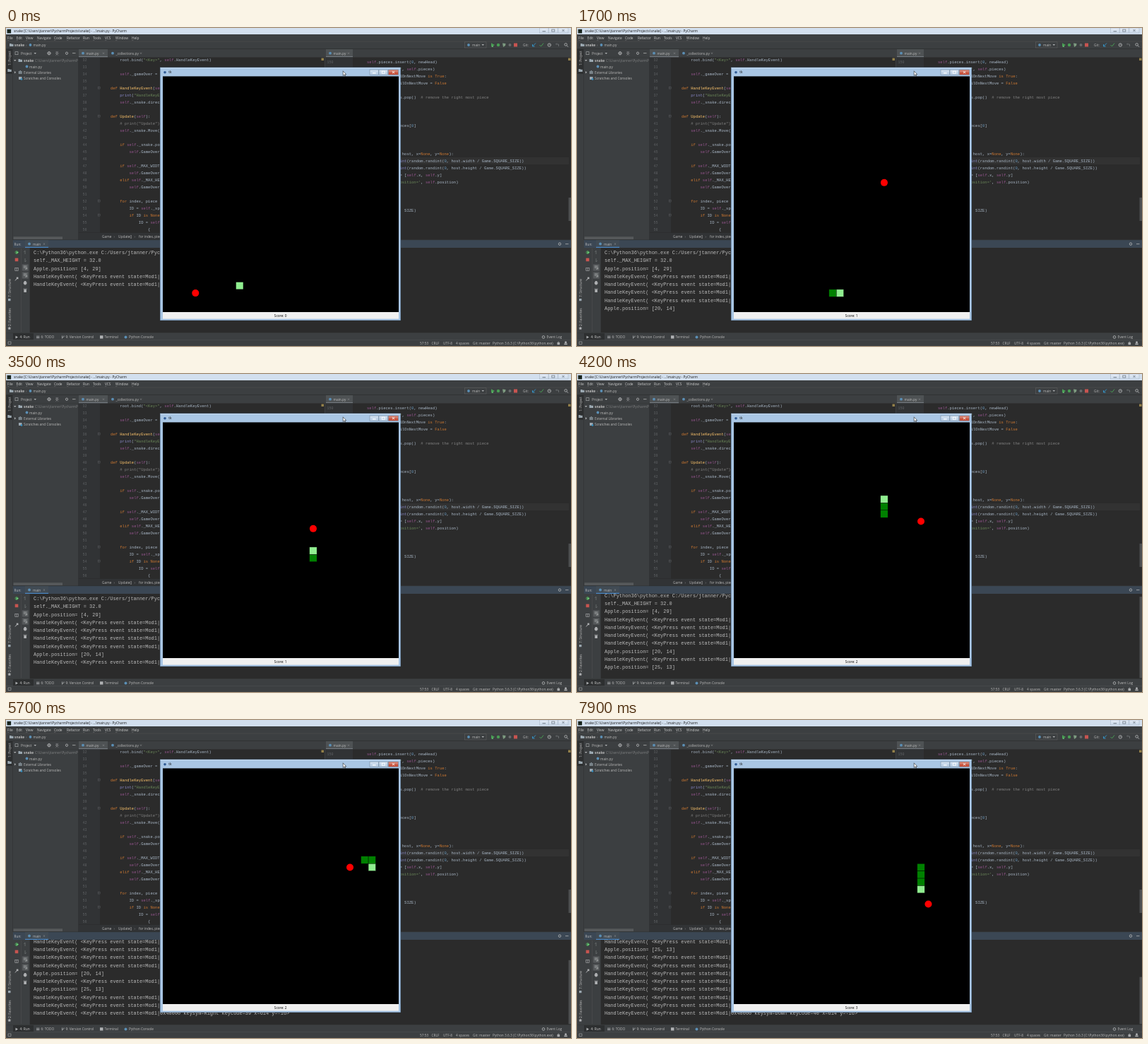
Recreate the animation shown at these times as an HTML page with a canvas. Size 800 by 450 pixels, loop 8000 ms.

```html
<!DOCTYPE html>
<html lang="en">
<head>
<meta charset="utf-8">
<title>Snake</title>
<style>
html, body { margin: 0; width: 100%; height: 100%; overflow: hidden; background: #2b2b2b; }
canvas { display: block; }
</style>
</head>
<body>
<canvas id="stage" width="800" height="450"></canvas>
<script>
const ctx = document.getElementById('stage').getContext('2d');
const SANS = '"Open Sans", sans-serif';
const MONO = '"Liberation Mono", monospace';
const STEP = 100, STEPS = 80;
const PANEL = '#3c3f41', EDITOR = '#2b2b2b', TEXT = '#bbbbbb', DIM = '#8a8c8d', ICON = '#afb1b3';
const RED = '#c75450', GREEN = '#499c54', BLUE = '#3592c4', THUMB = '#4d4f50';

function rect(x, y, w, h, color) {
  ctx.fillStyle = color;
  ctx.fillRect(x, y, w, h);
}

function frame(x, y, w, h, color, width = 0.6) {
  ctx.strokeStyle = color;
  ctx.lineWidth = width;
  ctx.strokeRect(x, y, w, h);
}

function disc(x, y, r, color) {
  ctx.fillStyle = color;
  ctx.beginPath();
  ctx.arc(x, y, r, 0, Math.PI * 2);
  ctx.fill();
}

function ring(x, y, r, color) {
  ctx.strokeStyle = color;
  ctx.lineWidth = 0.9;
  ctx.beginPath();
  ctx.arc(x, y, r, 0, Math.PI * 2);
  ctx.stroke();
}

function line(color, width, ...points) {
  ctx.strokeStyle = color;
  ctx.lineWidth = width;
  ctx.beginPath();
  for (let i = 0; i < points.length; i += 2) ctx.lineTo(points[i], points[i + 1]);
  ctx.stroke();
}

function shape(color, ...points) {
  ctx.fillStyle = color;
  ctx.beginPath();
  for (let i = 0; i < points.length; i += 2) ctx.lineTo(points[i], points[i + 1]);
  ctx.fill();
}

// Laid out at ten times the size so that tiny glyphs keep exact advances.
const BASELINE_DROP = 0.7;
function text(str, x, y, { color = TEXT, size = 4.8, font = SANS, weight = '', align = 'left', turn = 0 } = {}) {
  ctx.save();
  ctx.translate(x, y);
  ctx.rotate(turn);
  ctx.translate(0, BASELINE_DROP);
  ctx.scale(0.1, 0.1);
  ctx.font = `${weight} ${size * 10}px ${font}`;
  ctx.textAlign = align;
  ctx.textBaseline = 'middle';
  ctx.fillStyle = color;
  ctx.fillText(str, 0, 0);
  ctx.restore();
}

// Code editors
const CHAR = 3.32, CODE_SIZE = CHAR / 0.6001;
const TOKENS = /(#.*)|("[^"]*"|'[^']*')|\b(def|if|elif|else|for|is|in|or|return|None|True|False)\b|\b(self)\b|\b(print|int)\b|(\d+)|((?<=def )\w+)|[^\s\w#"']+|\w+|\s+/g;
const TOKEN_COLORS = ['#808080', '#6a8759', '#cc7832', '#94558d', '#8888c6', '#6897bb', '#ffc66d'];

function code(src, x, y) {
  for (const match of src.matchAll(TOKENS)) {
    const kind = match.slice(1).findIndex(group => group !== undefined);
    text(match[0], x + match.index * CHAR, y, { color: TOKEN_COLORS[kind] || '#a9b7c6', size: CODE_SIZE, font: MONO });
  }
}

const LEFT_CODE = `        root.bind("<Key>", self.HandleKeyEvent)

        self._gameOver = False

    def HandleKeyEvent(self, event):
        print("HandleKeyEvent(", event)
        self._snake.direction = event

    def Update(self):
        # print("Update")
        self._snake.Move()

        if self._snake.position:
            self.GameOver()

        if self._MAX_WIDTH:
            self.GameOver()
        elif self._MAX_HEIGHT:
            self.GameOver()

        for index, piece in self:
            ID = self._sprites
            if ID is None:
                ID = self._canvas
                    {`.split('\n');

const RIGHT_CODE = `    self.pieces.insert(0, newHead)
    print('pieces=', self.pieces)
    if self.addTailOnNextMove is True:
        self.addTailOnNextMove = False
    else:
        self.pieces.pop()  # remove the right most piece



    return self.pieces[0]



def __init__(self, host, x=None, y=None):
    self.x = x or int(random.randint(0, host.width / Game.SQUARE_SIZE))
    self.y = y or int(random.randint(0, host.height / Game.SQUARE_SIZE))
    self.position = [self.x, self.y]
    print('Apple.position=', self.position)



                    SIZE)`.split('\n');

function pyIcon(x, y) {
  disc(x, y, 1.9, '#5b8fb5');
}

function folder(x, y) {
  shape('#9aa7b0', x, y - 2, x + 2.2, y - 2, x + 3, y - 1.2, x + 5.5, y - 1.2, x + 5.5, y + 2, x, y + 2);
}

function cross(x, y, r, color, width = 0.6) {
  line(color, width, x - r, y - r, x + r, y + r);
  line(color, width, x + r, y - r, x - r, y + r);
}

function tab(x, w, label, active) {
  rect(x, 30, w, 11, active ? '#4e5254' : PANEL);
  if (active) rect(x, 40, w, 1.2, '#747a80');
  pyIcon(x + 6, 35.7);
  text(label, x + 10.5, 35.8);
  cross(x + w - 6, 35.7, 1.1, DIM);
}

function drawEditors() {
  rect(102, 30, 698, 11.5, PANEL);
  rect(103, 41.5, 697, 258, EDITOR);
  rect(103, 41.5, 30, 248, '#313335');
  tab(103, 41, 'main.py', true);
  tab(145, 52, '_collections.py', false);
  tab(453, 38, 'main.py', true);
  rect(451, 30, 1.2, 270, PANEL);
  rect(452, 41.5, 39, 258, '#313335');
  rect(452, 183, 345, 10, '#323232');

  LEFT_CODE.forEach((src, i) => {
    const y = 44.6 + i * 10;
    text(String(32 + i), 114.5, y, { color: '#606366', size: 5, font: MONO, align: 'right' });
    code(src, 134.7, y);
    if (/^ *(def|for)/.test(src) || i === 22) frame(130.3, y - 1.4, 2.8, 2.8, '#606366', 0.5);
  });
  text('150', 463.5, 47.6, { color: '#606366', size: 5, font: MONO, align: 'right' });
  RIGHT_CODE.forEach((src, i) => code(src, 497.7, 47.8 + i * 10));

  rect(446.5, 42.5, 3.5, 3.5, '#93804a');
  rect(796, 42.5, 3.5, 3.5, '#93804a');
  rect(796.5, 240, 3.5, 33, THUMB);

  rect(103, 290, 348, 10, '#313335');
  text('Game', 136, 295.5);
  text('›', 152.5, 295.2, { color: DIM });
  text('Update()', 159, 295.5);
  text('›', 181.5, 295.2, { color: DIM });
  text('for index, piece', 188, 295.5);
}

// Minimise, maximise and close buttons of a window title
function captionButtons(x, y, h, { face, close, edge, glyph }) {
  const button = (left, w, color) => {
    rect(left, y, w, h, color);
    rect(left, y, w, h / 2, 'rgba(255,255,255,0.25)');
    frame(left, y, w, h, edge, 0.5);
  };
  button(x, 12.5, face);
  button(x + 13, 12.5, face);
  button(x + 26.5, 14, close);
  const middle = y + h / 2;
  rect(x + 4, middle + 0.6, 4.6, 1.2, glyph);
  frame(x + 17.3, middle - 1.4, 4, 3, glyph, 0.9);
  cross(x + 33.5, middle, 1.5, glyph, 1);
}

function drawTopBars() {
  rect(0, 0, 800, 450, PANEL);
  rect(0, 0, 800, 9, '#d2dfee');
  rect(1.5, 1.8, 5.6, 5.6, '#18241d');
  text('snake [C:\\Users\\jtanner\\PycharmProjects\\snake] - ...\\main.py - PyCharm', 11, 4.4, { color: '#1c1c1c' });
  captionButtons(755.5, 0, 7, { face: '#d2dfee', close: '#d2dfee', edge: '#a3b1c1', glyph: '#7d8894' });
  const menu = { File: 2, Edit: 14.5, View: 28, Navigate: 44, Code: 68, Refactor: 86, Run: 109, Tools: 123, VCS: 140, Window: 155, Help: 178 };
  for (const item in menu) {
    text(item, menu[item], 14, { color: '#cccccc' });
    rect(menu[item], 17, 2.4, 0.3, '#999999');
  }
  rect(0, 18.8, 800, 0.5, '#515151');
  folder(5, 24);
  text('snake', 12, 24, { weight: 'bold' });
  text('›', 28, 23.7, { color: DIM });
  pyIcon(34.5, 24);
  text('main.py', 38.5, 24);
  rect(0, 29.4, 800, 0.6, '#282a2b');

  frame(649.5, 19.8, 30.5, 8.2, '#5e6060');
  pyIcon(655, 24);
  text('main', 660, 24);
  shape(ICON, 673.5, 23, 677, 23, 675.2, 25);
  shape(GREEN, 687, 21.3, 692, 24, 687, 26.7);
  disc(689, 26, 0.9, '#6bd17a');
  disc(697, 24, 2.2, GREEN);
  shape('#7d9a80', 703, 21.5, 707.5, 22, 707, 25, 704, 27);
  disc(713.5, 24, 2, '#686b6d');
  rect(719, 21.5, 5, 5, RED);
  text('Git:', 732, 24);
  line(BLUE, 1, 750, 21.5, 745.5, 26, 745.5, 23);
  line(BLUE, 1, 745.5, 26, 748.5, 26);
  line(GREEN, 1, 755.5, 24, 757.5, 26, 761, 21.5);
  ring(769.3, 24, 2.2, ICON);
  line(ICON, 0.6, 769.3, 22.5, 769.3, 24, 770.5, 24);
  line('#6e7173', 0.9, 782.5, 26, 782.5, 23, 778.5, 23, 780, 21.5);
  ring(792.6, 23.4, 1.8, ICON);
  line(ICON, 0.9, 794, 24.8, 796, 26.8);
}

function drawProject() {
  rect(0, 30, 9, 270, PANEL);
  rect(0, 30, 9, 35, '#2d2f30');
  text('1: Project', 4.6, 53, { turn: -Math.PI / 2, color: '#c5c5c5' });
  folder(2.3, 60);
  rect(9.2, 30, 0.6, 402, '#2f3132');
  frame(13, 33.7, 4, 4, ICON);
  text('Project', 21, 35.8);
  shape(ICON, 39.5, 35, 43, 35, 41.2, 37);
  ring(61, 35.7, 2.1, ICON);
  line(ICON, 0.6, 61, 33, 61, 38.4);
  line(ICON, 0.6, 58.3, 35.7, 63.7, 35.7);
  line(ICON, 0.7, 70, 35.7, 74.5, 35.7);
  line(ICON, 0.7, 70.7, 33, 72.2, 34.5, 73.7, 33);
  line(ICON, 0.7, 70.7, 38.4, 72.2, 36.9, 73.7, 38.4);
  ring(86, 35.7, 1.6, ICON);
  rect(94, 35.3, 4.5, 0.8, ICON);
  rect(10, 41, 92, 0.5, '#323435');

  ctx.save();
  ctx.beginPath();
  ctx.rect(10, 41, 92, 259);
  ctx.clip();
  shape(ICON, 11, 45, 14.5, 45, 12.7, 47);
  folder(17.5, 46);
  text('snake', 25, 46.1, { weight: 'bold' });
  text('C:\\Users\\jtanner\\PycharmProjects\\snake', 41, 46.1, { color: '#7f8182' });
  pyIcon(29.5, 54.5);
  text('main.py', 33, 54.6);
  shape(ICON, 12, 61, 14, 62.7, 12, 64.4);
  for (let i = 0; i < 3; i++) rect(18 + i * 1.7, 61 - i % 2, 1.1, 4 + i % 2, '#9aa7b0');
  text('External Libraries', 25, 62.8);
  rect(18, 69, 4.5, 4, '#9aa7b0');
  disc(22, 72.5, 1.3, BLUE);
  text('Scratches and Consoles', 25, 71.1);
  rect(10.5, 295.3, 69.5, 3.7, '#56595b');
  ctx.restore();
  rect(102, 30, 0.8, 270, '#2f3132');
}

function drawRunPanel() {
  rect(0, 300, 800, 150, PANEL);
  rect(10, 300, 790, 11, '#3b4754');
  rect(10, 299.6, 790, 0.5, '#2b2d2e');
  text('Run:', 11.5, 305.6);
  rect(27, 300, 33, 11, '#414b54');
  rect(27, 309.8, 33, 1.2, '#4a88c7');
  pyIcon(33, 305.5);
  text('main', 38, 305.6);
  cross(54, 305.6, 1.1, DIM);
  ring(784, 305.6, 1.7, ICON);
  rect(792, 305.3, 4.5, 0.8, ICON);

  rect(34, 311, 766, 120, EDITOR);
  rect(21.3, 312, 0.5, 118, '#515354');
  rect(33.5, 311, 0.5, 120, '#323435');
  ring(15, 317.5, 2, GREEN);
  shape('#6bd17a', 14.5, 316, 18, 317.5, 14.5, 319.5);
  rect(12.7, 325.6, 4.6, 4.6, RED);
  frame(12.8, 339.5, 4.4, 3.8, ICON);
  line(ICON, 0.6, 15, 339.5, 15, 343);
  line(ICON, 1, 13, 357.5, 15, 355, 17, 353);
  rect(14.8, 352.6, 2.6, 2.6, ICON);
  line('#6e7173', 0.8, 27, 320, 27, 315, 25.3, 316.8);
  line('#6e7173', 0.8, 27, 326, 27, 331, 28.7, 329.2);
  for (const y of [339, 350]) {
    rect(22.8, y - 4.6, 9, 9.2, '#56595b');
    line(ICON, 0.8, 24.8, y - 2, 29.5, y - 2);
    line(ICON, 0.8, 24.8, y, 29.5, y, 29.5, y + 2, 27, y + 2);
  }
  rect(24.8, 359.5, 4.6, 2.8, ICON);
  rect(25.8, 358, 2.6, 5.4, ICON);
  rect(25.3, 370, 3.6, 4, ICON);
  rect(24.6, 368.8, 5, 0.7, ICON);

  text('7: Structure', 4.6, 381, { turn: -Math.PI / 2 });
  rect(3, 383, 3.5, 3.2, '#9aa7b0');
  text('2: Favorites', 4.6, 422, { turn: -Math.PI / 2 });
  shape(ICON, 4.8, 422.3, 5.6, 424, 7.4, 424.3, 6, 425.5, 6.4, 427.3, 4.8, 426.3, 3.2, 427.3, 3.6, 425.5, 2.2, 424.3, 4, 424);
}

function drawBottomBars() {
  rect(0, 431, 800, 19, PANEL);
  rect(0, 431, 800, 0.5, '#323435');
  rect(10, 432, 29, 9.5, '#2d2f30');
  shape(ICON, 13.5, 435.4, 17, 437.4, 13.5, 439.4);
  text('4: Run', 19.5, 437, { color: '#d0d0d0' });
  for (let i = 0; i < 3; i++) rect(43, 435.7 + i * 1.4, 4.4, 0.7, ICON);
  text('6: TODO', 49.5, 437);
  line(ICON, 0.8, 79.5, 439.4, 79.5, 435.4);
  line(ICON, 0.8, 79.5, 438.4, 82, 436.9, 82, 435.4);
  text('9: Version Control', 84.5, 437);
  rect(133, 435.2, 4.5, 4.3, ICON);
  text('Terminal', 139.5, 437);
  disc(169.5, 437.4, 2, '#5b8fb5');
  text('Python Console', 174, 437);
  ring(761, 437.4, 1.8, ICON);
  text('Event Log', 765.5, 437);
  rect(0, 441.3, 800, 0.5, '#515354');

  frame(3, 444, 4, 3.6, ICON);
  text('57:53', 586, 445.8);
  text('CRLF', 602.5, 445.8);
  text('UTF-8', 619, 445.8);
  text('4 spaces', 637, 445.8);
  text('Git: master', 661, 445.8);
  text('Python 3.6.3 (C:\\Python36\\python.exe)', 689, 445.8);
  rect(780.5, 445.4, 3.6, 2.8, ICON);
  ring(782.3, 445.4, 1.1, ICON);
  disc(792.5, 444.8, 1.5, ICON);
  rect(790.3, 446.5, 4.4, 1.6, ICON);
}

// Console output, each entry with the step at which it is printed
const KEYCODES = { Left: 37, Up: 38, Right: 39, Down: 40 };
const key = name => `HandleKeyEvent( <KeyPress event state=Mod1|0x40000 keysym=${name} keycode=${KEYCODES[name]} x=614 y=-16>`;
const APPLES = [[4, 29], [20, 14], [25, 13], [26, 18]];
const apple = i => `Apple.position= [${APPLES[i].join(', ')}]`;
const LOG = [
  [0, 'C:\\Python36\\python.exe C:/Users/jtanner/PycharmProjects/snake/main.py'],
  [0, 'self._MAX_HEIGHT = 32.0'],
  [0, apple(0)], [0, key('Up')], [0, key('Left')],
  [10, key('Down')], [11, key('Right')], [11, apple(1)],
  [27, key('Up')], [42, apple(2)], [48, key('Right')],
  [52, key('Down')], [56, key('Right')], [60, key('Down')],
  [62, key('Left')], [66, key('Up')], [73, key('Right')], [74, key('Down')]
];
const VIEW = { top: 311, height: 119.5, pitch: 11.25 };

function drawConsole(step) {
  const { top, height, pitch } = VIEW;
  const shown = LOG.filter(([at]) => at <= step);
  const content = (shown.length + 1) * pitch;
  const scroll = Math.max(0, content - height);
  ctx.save();
  ctx.beginPath();
  ctx.rect(34, top, 766, height);
  ctx.clip();
  shown.forEach(([, str], i) => text(str, 39, top + 6.5 - scroll + i * pitch, { size: 6.94, font: MONO }));
  if (scroll) {
    const thumb = height * height / content;
    rect(796.5, top + height - thumb, 3.5, thumb, THUMB);
  }
  ctx.restore();
}

// Game window
const CELL = 10.417, LEFT = 221.4, TOP = 67.8;
const CORNERS = [[10, 28], [4, 28], [4, 29], [20, 29], [20, 8], [24, 8], [24, 12], [28, 12], [28, 14], [24, 14], [24, 7], [25, 7], [25, 16]];
const PATH = [CORNERS[0]];
for (const [cx, cy] of CORNERS.slice(1)) {
  let [x, y] = PATH[PATH.length - 1];
  while (x !== cx || y !== cy) {
    x += Math.sign(cx - x);
    y += Math.sign(cy - y);
    PATH.push([x, y]);
  }
}
const MEALS = APPLES.slice(0, 3).map(([x, y]) => PATH.findIndex(p => p[0] === x && p[1] === y));

function drawWindow(score) {
  rect(218, 55.5, 341, 358.5, '#4a6784');
  rect(218.5, 56, 340, 357.5, '#a9c6e4');
  rect(218.5, 56, 340, 0.6, '#dce8f5');
  disc(225, 62.8, 1.8, '#2f5a94');
  text('tk', 230.3, 62.5, { color: '#111111' });
  captionButtons(515, 59, 7.2, { face: '#bcd0e6', close: '#c8523c', edge: '#6d8299', glyph: '#ffffff' });

  rect(222, 68.4, 334, 333.6, '#000000');
  rect(222, 402, 334, 9.6, '#f0f0f0');
  text('Score: ' + score, 388.6, 406.7, { color: '#000000', align: 'center' });
}

function drawGame(step) {
  const eaten = MEALS.filter(at => at <= step).length;
  const length = 1 + MEALS.filter(at => at < step).length;
  drawWindow(eaten);

  const [ax, ay] = APPLES[eaten];
  disc(LEFT + (ax + 0.5) * CELL, TOP + (ay + 0.5) * CELL, CELL / 2 - 0.2, '#ff0000');
  for (let i = length - 1; i >= 0; i--) {
    const [x, y] = PATH[step - i];
    rect(LEFT + x * CELL, TOP + y * CELL, CELL, CELL, i ? '#008000' : '#90ee90');
    frame(LEFT + x * CELL, TOP + y * CELL, CELL, CELL, '#000000', 0.42);
  }
}

function drawCursor() {
  const x = 477.2, y = 60.8;
  const arrow = [x, y, x, y + 6.6, x + 1.5, y + 5.2, x + 2.6, y + 7.6, x + 3.5, y + 7.2, x + 2.5, y + 4.9, x + 4.5, y + 4.8];
  shape('#ffffff', ...arrow);
  line('#000000', 0.5, ...arrow, x, y);
}

function draw(step) {
  drawTopBars();
  drawProject();
  drawEditors();
  drawRunPanel();
  drawConsole(step);
  drawBottomBars();
  drawGame(step);
  drawCursor();
}

let lastStep = -1;
const start = performance.now();
function tick() {
  let step = Math.floor(Math.max(0, performance.now() - start) / STEP) % STEPS;
  if (step === 58) step = 57; // the picture holds for one beat here
  if (step !== lastStep) draw(lastStep = step);
  requestAnimationFrame(tick);
}
tick();
</script>
</body>
</html>
```
